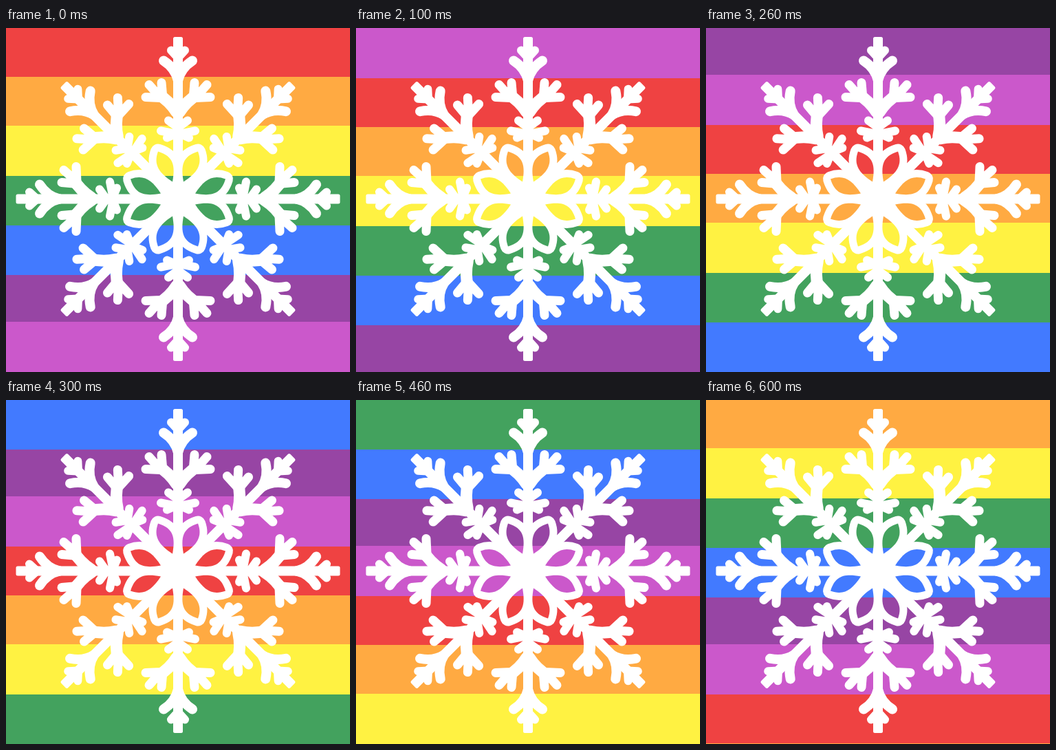
These frames come from a looping animation (500x500 px, 0.7 s). An HTML page:

```html
<!DOCTYPE html>
<html lang="en">
<head>
<meta charset="utf-8">
<title>Rainbow snowflake</title>
<style>
  html, body { margin: 0; width: 100%; height: 100%; overflow: hidden; }
  svg { display: block; width: 100vw; height: 100vh; }
</style>
</head>
<body>
<svg viewBox="0 0 500 500">
  <defs>
    <mask id="flake" maskUnits="userSpaceOnUse" x="0" y="0" width="500" height="500">
      <g id="flakeParts" transform="translate(250 248.5)" fill="#fff" stroke-linecap="round" stroke-linejoin="round"></g>
    </mask>
  </defs>
  <g id="stripes" shape-rendering="crispEdges"></g>
  <rect width="500" height="500" fill="#fff" mask="url(#flake)"/>
</svg>
<script>
const STEP_MS = 100;
const bands = [
  ['#ef4242', 71], ['#ffaa42', 71], ['#fff242', 73], ['#43a25e', 72],
  ['#427aff', 72], ['#9745a4', 68], ['#cb58cb', 73]
];

const repeat = (count, shape) => Array.from({ length: count }, (_, i) =>
  `<g transform="rotate(${i * 360 / count})">${shape}</g>`).join('');
const mirrored = shape => `${shape}<g transform="scale(-1 1)">${shape}</g>`;
const limb = (width, d) =>
  `<path d="${d}" fill="none" stroke="#fff" stroke-width="${width}"/>`;

// The arm points up; every limb grows to the right and is mirrored.
const stem = '<rect x="-7" y="-235.5" width="14" height="235.5" rx="2.5"/>';
const tip = limb(12, 'M0 -205L10 -216') + limb(14, 'M0 -172Q4 -190 21 -201');
const branch = limb(17, 'M2 -126Q12 -142 30 -153')
  + limb(13, 'M22 -146L24 -169M25 -147L42 -166M25 -147L47 -148');
const bud = limb(12, 'M0 -104L14 -114M0 -94L25 -99M0 -96L16 -89');
const arm = stem + mirrored(tip + branch + bud);

// Each petal is a hole with a white rim around it.
const petal = 'M8 -25C4 -48 6 -62 29 -69C36 -50 28 -38 8 -25Z';
const rims = mirrored(limb(22, petal));
const holes = mirrored(`<path d="${petal}" fill="#000"/>`);

document.getElementById('flakeParts').innerHTML =
  '<circle r="26"/>' + repeat(4, rims) + repeat(8, arm) + repeat(4, holes);

const stripes = document.getElementById('stripes');

function render(ms) {
  const count = bands.length;
  const step = Math.floor(ms / STEP_MS) % count;
  let y = -Math.floor(step / 5);
  let markup = '';
  for (let i = 0; i <= count; i++) {
    const [color, height] = bands[(i - step + count) % count];
    markup += `<rect y="${y}" width="500" height="${height}" fill="${color}"/>`;
    y += height;
  }
  stripes.innerHTML = markup;
}

const start = performance.now();
function tick() {
  render(performance.now() - start);
  requestAnimationFrame(tick);
}
tick();
</script>
</body>
</html>
```
